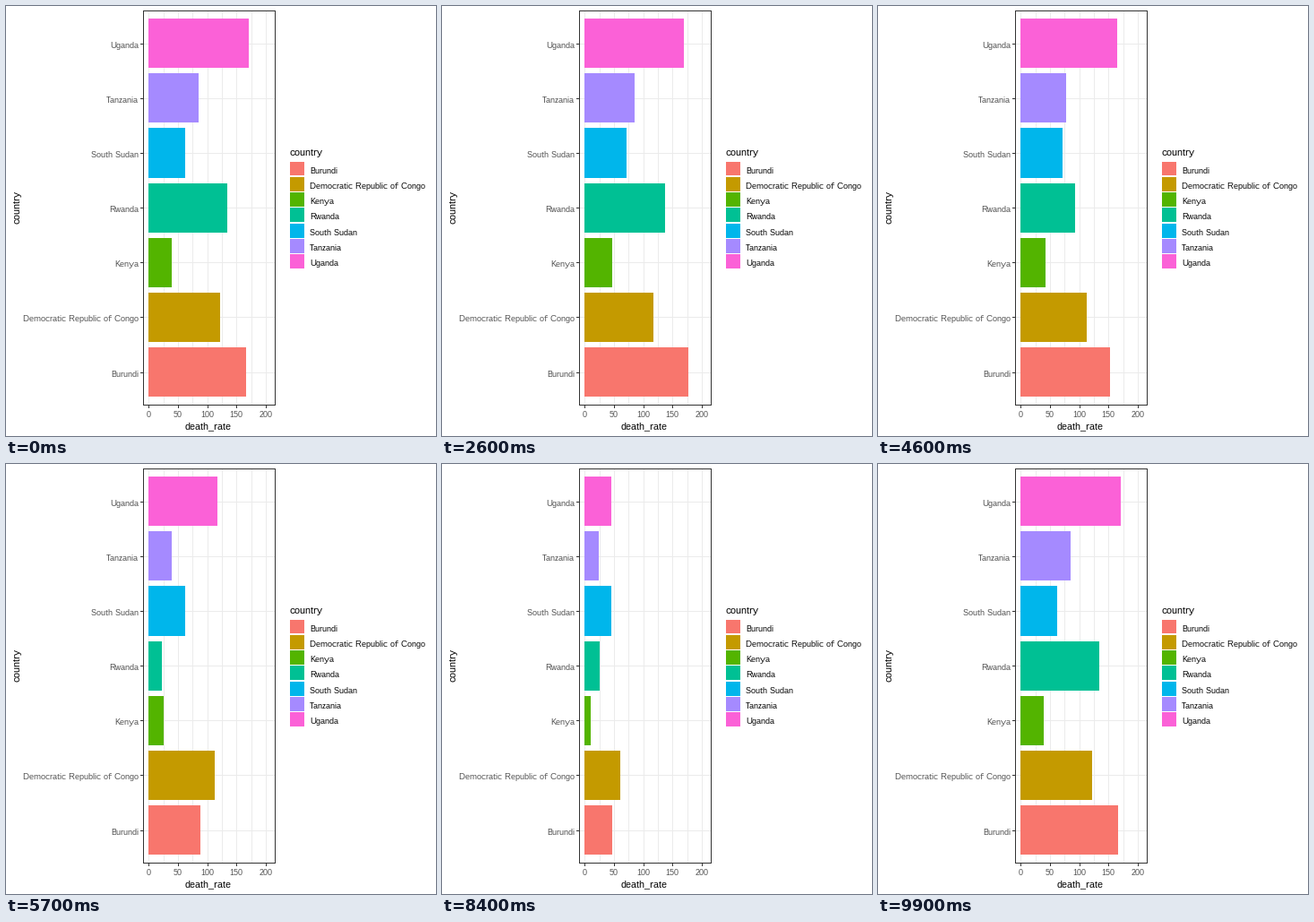
Animation of 480x480 px, one loop 10 s. Source, as a matplotlib script:

```python
import math

import matplotlib.pyplot as plt
import numpy as np
from matplotlib.animation import FuncAnimation
from matplotlib.patches import Rectangle

plt.rcParams.update({
    "font.family": "Liberation Sans",
    "text.hinting": "native",
    "text.hinting_factor": 1,
})

SIZE, DPI = 480, 100
FRAMES, INTERVAL = 100, 100
LEFT, TOP, RIGHT, BOTTOM = 153, 5, 300, 445
GRID, DARK, LABEL = "#EBEBEB", "#333333", "#4D4D4D"

# Key years, counted from the first, and the rates at them.
YEARS = [0, 6.5, 12, 15, 20, 24]
COUNTRIES = [
    ("Burundi", "#F8766D", [166.5, 177, 152.5, 88, 64, 47]),
    ("Democratic Republic of Congo", "#C49A00", [122, 117.5, 113, 113, 85, 61]),
    ("Kenya", "#53B400", [39.5, 47, 42.8, 26, 4, 10.5]),
    ("Rwanda", "#00C094", [134, 137.5, 93, 23, 36.5, 26]),
    ("South Sudan", "#00B6EB", [62, 72, 72, 62, 41, 46]),
    ("Tanzania", "#A58AFF", [85.5, 85.5, 78, 39.5, 29, 24.5]),
    ("Uganda", "#FB61D7", [171, 169.3, 165, 117.5, 81, 46]),
]
SWELL = {"Burundi": 34}  # extra rise and fall before the second key year

fig = plt.figure(figsize=(SIZE / DPI, SIZE / DPI), dpi=DPI, facecolor="white")
ax = fig.add_axes([0, 0, 1, 1])
ax.set_xlim(0, SIZE)
ax.set_ylim(SIZE, 0)
ax.axis("off")


def x_of(rate):
    return math.floor(159.95 + 0.652 * rate)


def y_of(row):
    return 42.3 + 61.12 * (len(COUNTRIES) - 1 - row)


def box(x0, y0, x1, y1, color, z=1):
    return ax.add_patch(Rectangle((x0, y0), x1 - x0, y1 - y0, facecolor=color,
                                  linewidth=0, antialiased=False, zorder=z))


def write(x, y, text, px=9, color="black", ha="left", **kw):
    ax.text(x, y, text, fontsize=px * 72 / DPI, color=color, ha=ha,
            va="baseline", **kw)


def year_at(i):
    """Four steps a year at first, with a halfway step; later three or four."""
    if i < 2 or i == FRAMES - 1:
        return 0
    if i < 46:
        year, step = divmod(i - 2, 4)
        return year + (0.5 if step == 0 else 1)
    if i < 57:
        return 12 + (i - 45) // 4
    return 15 + (i - 57) // 3


def rate_at(year, name, rates):
    rate = np.interp(year, YEARS, rates)
    if year < YEARS[1]:
        rate += SWELL.get(name, 0) * math.sin(math.pi * year / YEARS[1]) ** 2
    # Past the last key year the trend goes on at a slower pace.
    slope = (rates[-1] - rates[-2]) / (YEARS[-1] - YEARS[-2])
    return rate + 0.4 * slope * max(0, year - YEARS[-1])


# Panel grid, axis ticks and their labels
for rate in range(0, 201, 25):
    x = x_of(rate)
    box(x, TOP, x + 1, BOTTOM, GRID)
    if rate % 50 == 0:
        box(x, BOTTOM, x + 1, BOTTOM + 4, DARK)
        write(x, 459, str(rate), color=LABEL, ha="center")

bars = []
for row, (name, color, _) in enumerate(COUNTRIES):
    mid = y_of(row)
    y = math.floor(mid)
    box(LEFT, y, RIGHT, y + 1, GRID)
    box(LEFT - 3, y, LEFT, y + 1, DARK)
    write(148, y + 5, name, color=LABEL, ha="right")
    bars.append(box(x_of(0), math.floor(mid - 27.55), x_of(0) + 1,
                    math.floor(mid + 27.55), color, 2))

    key = 174.05 + 17.28 * row
    box(317, math.floor(key), 333, math.floor(key + 15.85), color)
    write(339, math.floor(key) + 13, name)

# Panel border
for edge in [(LEFT, TOP, RIGHT + 1, TOP + 1),
             (LEFT, BOTTOM, RIGHT + 1, BOTTOM + 1),
             (LEFT, TOP, LEFT + 1, BOTTOM + 1),
             (RIGHT, TOP, RIGHT + 1, BOTTOM + 1)]:
    box(*edge, DARK, 3)

write(226, 472, "death_rate", px=11, ha="center")
write(316, 167, "country", px=11)
write(15, 224.5, "country", px=11, ha="center", rotation=90,
      rotation_mode="anchor")


def update(i):
    year = year_at(i)
    for bar, (name, _, rates) in zip(bars, COUNTRIES):
        bar.set_width(x_of(rate_at(year, name, rates)) - x_of(0))
    return bars


anim = FuncAnimation(fig, update, frames=FRAMES, interval=INTERVAL,
                     repeat=True, repeat_delay=0, blit=False)
plt.show()
```
